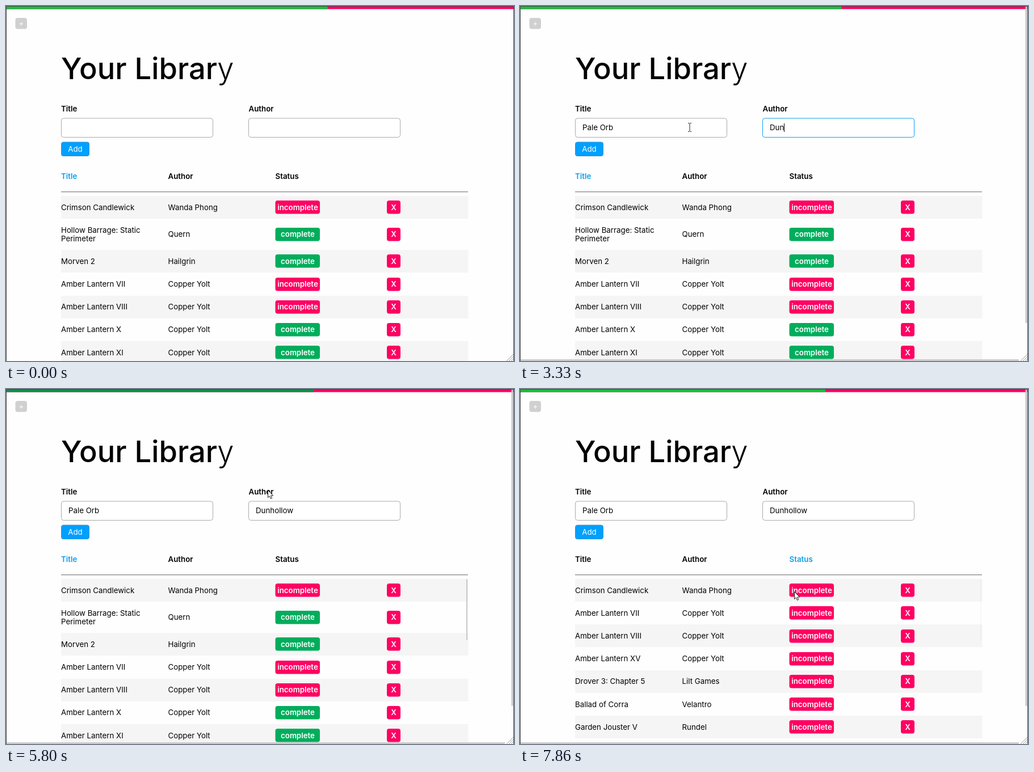
An HTML page for the animation above (8 s loop, 895 px wide and 626 px high).

```html
<!DOCTYPE html>
<html lang="en">
<head>
<meta charset="utf-8">
<title>Your Library</title>
<style>
  html, body { margin: 0; width: 100%; height: 100%; overflow: hidden; background: #fefefe; }
  svg { display: block; width: 895px; height: 626px; font: 13.3px Inter, sans-serif; }
  text { white-space: pre; }
  .bold { font-weight: 600; }
  .heading { font-size: 52.5px; font-weight: 500; }
  .white { fill: #fff; }
  .middle { text-anchor: middle; }
</style>
</head>
<body>
<svg id="stage" viewBox="0 0 895 626"></svg>
<script>
const LOOP = 8000;
const PINK = '#ff0062', GREEN = '#00ad5c', BLUE = '#00a0ff', LINK = '#0a9fec';
const stage = document.getElementById('stage');
const ruler = document.createElement('canvas').getContext('2d');

const crimson = ['Crimson Candlewick', 'Wanda Phong', false];
const amber = (number, done) => ['Amber Lantern ' + number, 'Copper Yolt', done];
const byTitle = [
  crimson,
  ['Hollow Barrage: Static|Perimeter', 'Quern', true],
  ['Morven 2', 'Hailgrin', true],
  amber('VII', false), amber('VIII', false), amber('X', true), amber('XI', true)
];
const byStatus = [
  crimson,
  amber('VII', false), amber('VIII', false), amber('XV', false),
  ['Drover 3: Chapter 5', 'Lilt Games', false],
  ['Ballad of Corra', 'Velantro', false],
  ['Garden Jouster V', 'Rundel', false]
];

const titleEntry = { text: 'Pale Orb', keys: [1500, 1830, 1930, 2000, 2060, 2300, 2460, 2560] };
const authorEntry = { text: 'Dunhollow', keys: [3060, 3200, 3300, 3460, 3600, 3730, 3930, 4060, 4130] };

// Pointer path: time, x, y
const path = [
  [300, 430, 625], [950, 299, 214], [4460, 299, 214], [4830, 127, 245], [5160, 127, 245],
  [5800, 461, 178], [5860, 484, 174], [6200, 655, 190], [6660, 496, 300], [6700, 494, 302],
  [7160, 494, 307], [7430, 494, 307], [7800, 483, 357]
];

const within = (t, from, to) => t >= from && t < to;
const clamp = v => Math.min(1, Math.max(0, v));

const rect = (x, y, w, h, fill, radius = 0, extra = '') =>
  `<rect x="${x}" y="${y}" width="${w}" height="${h}" rx="${radius}" fill="${fill}" ${extra}/>`;
const label = (x, y, content, cls = '', fill = '') =>
  `<text x="${x}" y="${y}" class="${cls}" ${fill && `fill="${fill}"`}>${content}</text>`;

function pointerAt(t) {
  const next = path.findIndex(p => p[0] > t);
  if (next < 0) return path[path.length - 1].slice(1);
  const [t0, x0, y0] = path[next - 1], [t1, x1, y1] = path[next];
  const p = (t - t0) / (t1 - t0);
  return [x0 + (x1 - x0) * p, y0 + (y1 - y0) * p];
}

function pointer(t) {
  if (t < 300 || within(t, 5030, 5160) || within(t, 6960, 7160)) return '';
  const [x, y] = pointerAt(t).map(Math.round);
  const overField = within(y, 198, 232) && (within(x, 97, 365) || within(x, 427, 695));
  const shape = overField
    ? '<path d="M-3-7.5H-1L0-6.5L1-7.5H3M0-6.5V6.5M-3 7.5H-1L0 6.5L1 7.5H3" fill="none" stroke="#222"/>'
    : '<path d="M.5.5V13.5L3.4 10.8L5.4 15.4L7.6 14.4L5.6 10H9.7Z" fill="#fff" stroke="#222"/>';
  return `<g transform="translate(${x} ${y})">${shape}</g>`;
}

const touch = (x, y) => `<circle cx="${x}" cy="${y}" r="25" fill="url(#touch)"/>`;

function field(x, entry, t, focused, caretOn) {
  const typed = entry.text.slice(0, entry.keys.filter(k => k <= t).length);
  ruler.font = '13.3px Inter, sans-serif';
  const caretX = Math.round(x + 13 + ruler.measureText(typed).width);
  return rect(x + .5, 198, 267, 33.5, '#fff', 4, `stroke="${focused ? LINK : '#aaa'}"`) +
    label(x + 13, 218.5, typed) +
    (focused && caretOn ? rect(caretX, 207, 1, 15, '#000') : '');
}

function table(rows) {
  let top = 335;
  return rows.map(([title, author, done], i) => {
    const lines = title.split('|');
    const height = lines.length > 1 ? 55 : 40.2;
    const mid = top + height / 2;
    const boxY = Math.round(mid - 12);
    const color = done ? GREEN : PINK;
    const out = (i % 2 ? '' : rect(97, Math.round(top), 717.5, 40, '#f5f5f5')) +
      lines.map((line, n) => label(97, mid + 4.5 + (n - (lines.length - 1) / 2) * 15, line)).join('') +
      label(285.5, mid + 4.5, author) +
      rect(474.5, boxY, 78.5, 23.5, color, 4) +
      label(514, mid + 4.5, done ? 'complete' : 'incomplete', 'bold white middle') +
      rect(671, boxY, 24, 23.5, PINK, 4) +
      label(683, mid + 4.5, 'X', 'bold white middle');
    top += height;
    return out;
  }).join('');
}

function render(t) {
  const sorted = t >= 7100;
  const scrollbars = within(t, 600, 5030) || t >= 5300;
  const dim = within(t, 300, 3060) || within(t, 5030, 6960);
  const progress = 565.5 - 28.5 * (1 - (1 - clamp((t - 5200) / 1000)) ** 2);
  const listBar = t < 5300 ? 0 : 1 - .85 * clamp((t - 7430) / 430);

  stage.innerHTML = `<defs><radialGradient id="touch">
      <stop offset="0" stop-color="#888" stop-opacity=".06"/>
      <stop offset=".8" stop-color="#888" stop-opacity=".13"/>
      <stop offset="1" stop-color="#888" stop-opacity=".17"/>
    </radialGradient></defs>` +
    rect(0, 0, 895, 626, '#fefefe') +
    rect(1, 1, 893, 4.5, PINK) +
    rect(1, 1, progress, 4.5, dim ? '#128f48' : '#16c03a') +
    rect(16.5, 21, 20.5, 19.5, '#d0d0d0', 4) +
    label(26.8, 35, '+', 'white middle') +
    label(97, 129, 'Your Librar<tspan font-weight="300">y</tspan>', 'heading') +
    label(97, 186, 'Title', 'bold') +
    label(427.5, 186, 'Author', 'bold') +
    field(97, titleEntry, t, within(t, 1000, 2700), !within(t, 1630, 1860)) +
    field(427, authorEntry, t, within(t, 2700, 5160), !within(t, 4300, 4800)) +
    rect(97.5, 240, 49, 24.5, BLUE, 3.5, 'stroke="#3c93cf"') +
    label(122, 257, 'Add', 'white middle') +
    label(97, 305, 'Title', 'bold', sorted ? '#000' : LINK) +
    label(285.5, 305, 'Author', 'bold') +
    label(474.5, 305, 'Status', 'bold', sorted ? LINK : '#000') +
    rect(97, 327, 717, 1.3, '#888') +
    table(sorted ? byStatus : byTitle) +
    rect(811, 335, 2, 108, '#c8c8c8', 1, `opacity="${listBar}"`) +
    (scrollbars ? rect(890.5, 1, 3, 558, '#c4c4c4', 1) + rect(1, 623, 878, 3, '#cbcbcb', 1) : '') +
    '<path d="M882 626L894 614M886 626L894 618M890 626L894 622" stroke="#999" fill="none"/>' +
    '<path d="M.5 626V.5H894.5V626" stroke="#44444c" fill="none"/>' +
    (within(t, 950, 1050) ? touch(299, 214) : '') +
    (within(t, 5030, 5160) ? touch(127, 245) : '') +
    (within(t, 6960, 7160) ? touch(494.5, 303) : '') +
    pointer(t);
}

const start = performance.now();
function tick() {
  render((performance.now() - start) % LOOP);
  requestAnimationFrame(tick);
}
tick();
</script>
</body>
</html>
```
